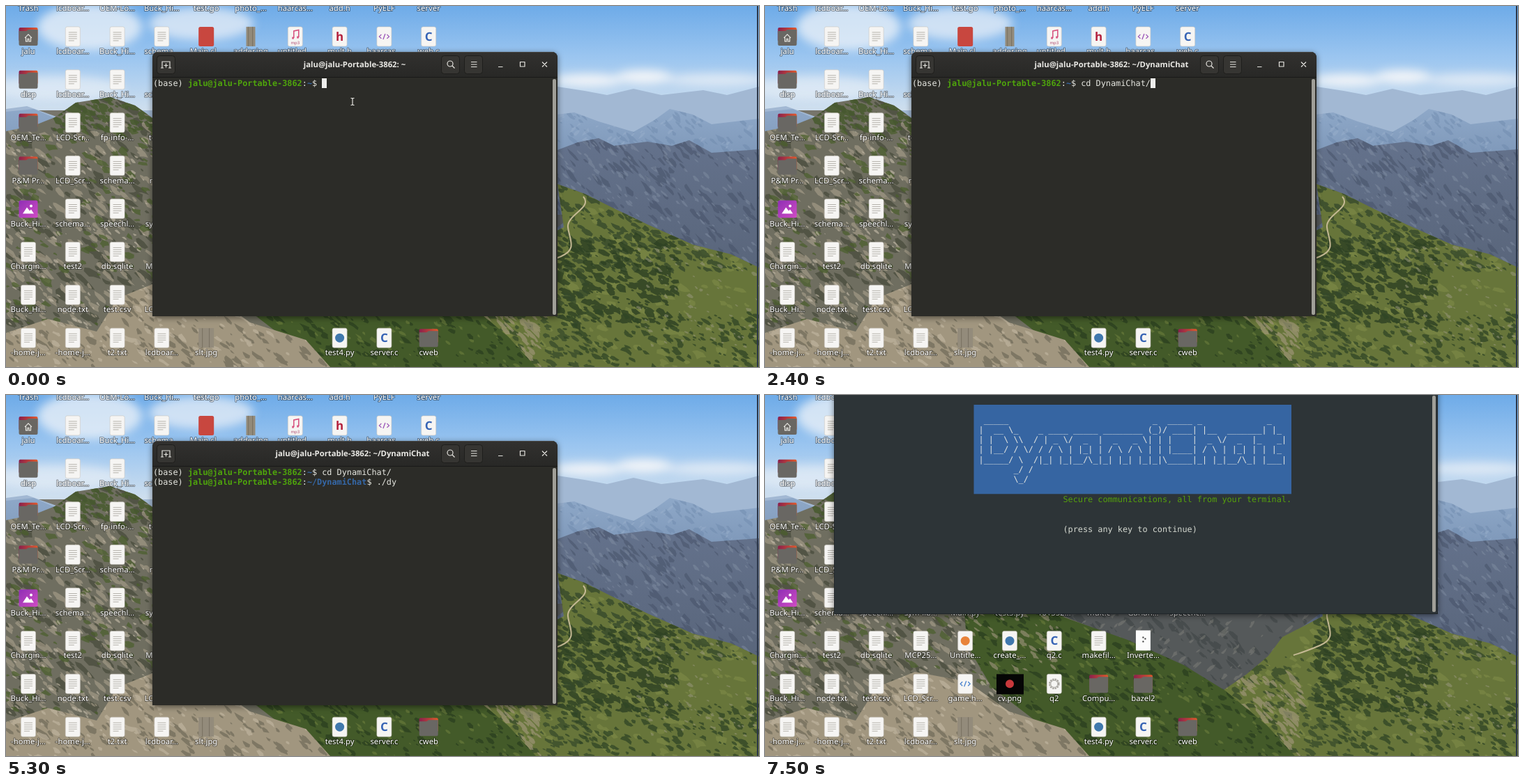
An HTML page that plays this animation: 1080 by 519 pixels, repeating every 8000 ms.

```html
<!DOCTYPE html>
<html lang="en">
<head>
<meta charset="utf-8">
<title>Terminal session</title>
<style>
  html, body { margin: 0; width: 100%; height: 100%; overflow: hidden; background: #77756b; }
  svg { display: block; width: 1080px; height: 519px; }
  text { white-space: pre; text-rendering: geometricPrecision; }
  .mono { font: 11.835px "DejaVu Sans Mono", monospace; fill: #e6e7e1; }
  .bold { font-weight: bold; }
  .label { font: 11.3px "Noto Sans", sans-serif; fill: #fff; text-anchor: middle;
           paint-order: stroke; stroke: rgba(0,0,0,.4); stroke-width: 2px; stroke-linejoin: round; }
  .title { font: bold 11.3px "Noto Sans", sans-serif; fill: #e9e8e4; text-anchor: middle; }
  .glyph { font: bold 17px "Noto Sans", sans-serif; text-anchor: middle; }
  .window { filter: drop-shadow(0 2px 4px rgba(0,0,0,.5)); }
  .line { fill: none; stroke: #e4e3de; stroke-width: 1.2; }
</style>
</head>
<body>
<svg viewBox="0 0 1080 519" xmlns="http://www.w3.org/2000/svg">
  <defs>
    <linearGradient id="sky" x2="0" y2="1">
      <stop offset="0" stop-color="#6eabe8"/><stop offset=".5" stop-color="#9cc6f0"/>
      <stop offset="1" stop-color="#cfdfee"/>
    </linearGradient>
    <linearGradient id="haze" x2="0" y2="1">
      <stop offset="0" stop-color="#8ea8c8"/><stop offset="1" stop-color="#7089ab"/>
    </linearGradient>
    <linearGradient id="range" x2="0" y2="1">
      <stop offset="0" stop-color="#64728c"/><stop offset="1" stop-color="#515c6e"/>
    </linearGradient>
    <linearGradient id="bar" x2="0" y2="1">
      <stop offset="0" stop-color="#32312f"/><stop offset="1" stop-color="#282826"/>
    </linearGradient>
    <linearGradient id="tab"><stop offset="0" stop-color="#8a1f4c"/><stop offset="1" stop-color="#e0592c"/></linearGradient>
    <linearGradient id="pic" x2="1" y2="1"><stop offset="0" stop-color="#8f2fb5"/><stop offset="1" stop-color="#d04cc4"/></linearGradient>
    <filter id="soft" x="-30%" y="-100%" width="160%" height="300%"><feGaussianBlur stdDeviation="7"/></filter>
  </defs>

  <g id="photo">
    <rect width="1080" height="150" fill="url(#sky)"/>
    <g fill="#f1f4f8" filter="url(#soft)">
      <ellipse cx="120" cy="30" rx="75" ry="34" opacity=".75"/>
      <ellipse cx="280" cy="25" rx="75" ry="24" opacity=".7"/>
      <ellipse cx="70" cy="118" rx="100" ry="18" opacity=".6"/>
      <ellipse cx="835" cy="107" rx="50" ry="9"/>
      <ellipse cx="915" cy="102" rx="40" ry="10"/>
      <ellipse cx="1020" cy="106" rx="75" ry="9" opacity=".7"/>
    </g>
  </g>
  <g id="icons"></g>
  <path d="M1078 0V519" stroke="#2b3648" stroke-width="2"/>

  <g id="shell" class="window">
    <path d="M210 446V74a8 8 0 0 1 8-8H783a8 8 0 0 1 8 8V446Z" fill="#2c2c28"/>
    <path d="M210 102V74a8 8 0 0 1 8-8H783a8 8 0 0 1 8 8V102Z" fill="url(#bar)"/>
    <path d="M210 102.5H791" stroke="#191918"/>
    <path d="M216 66.5H785" stroke="#454441"/>
    <g fill="#363532" stroke="#1e1e1c">
      <rect x="216.500" y="71.500" width="26" height="26" rx="4"/>
      <rect x="624.500" y="71.500" width="26" height="26" rx="4"/>
      <rect x="657.500" y="71.500" width="26" height="26" rx="4"/>
    </g>
    <g class="line">
      <path d="M224 89V80H235V89M222 89H226M233 89H237M229.500 82.500V88.500M226.500 85.500H232.500"/>
      <circle cx="637" cy="83" r="4"/><path d="M640 86L643.500 89.500"/>
      <path d="M667 80.500H675.500M667 84H675.500M667 87.500H675.500"/>
      <path d="M706 87.500H712.500M737.500 80.500H744V87H737.500ZM769 80.500L776 87.500M776 80.500L769 87.500"/>
    </g>
    <text id="title" class="title" x="500" y="88"></text>
    <rect x="784" y="105" width="5" height="339" rx="2" fill="#a09f98"/>
    <g id="first"></g>
    <g id="second"></g>
    <rect id="cursor" width="7" height="14" fill="#eeeeec"/>
    <path id="beam" class="line" d="M494.500 132.500H496L497 133.500L498 132.500H499.500M497 133.500V141.500M494.500 142.500H496L497 141.500L498 142.500H499.500"/>
  </g>

  <g id="splash">
    <g class="window">
      <path d="M99-20H965V315H99Z" fill="#2d3437"/>
    </g>
    <path d="M99.500 0V314.500H964.500V0" fill="none" stroke="#20262a"/>
    <rect x="957" y="1" width="5" height="311" rx="2" fill="#a09f98"/>
    <rect x="299.500" y="14" width="455.500" height="128.300" fill="#3665a2"/>
    <g id="banner"></g>
    <text class="mono" x="427.500" y="154" style="fill:#55a00c">Secure communications, all from your terminal.</text>
    <text class="mono" x="427.500" y="197" style="fill:#d3d7cf">(press any key to continue)</text>
  </g>
</svg>
<script>
const $ = id => document.getElementById(id);
const NS = 'http://www.w3.org/2000/svg';

function add(parent, tag, attrs, text) {
  const el = document.createElementNS(NS, tag);
  for (const k in attrs) el.setAttribute(k, attrs[k]);
  if (text) el.textContent = text;
  return parent.appendChild(el);
}

/* ---- wallpaper ---- */
let seed = 11;
const rand = () => (seed = seed * 16807 % 2147483647) / 2147483647;
const photo = $('photo');
let clips = 0;

function land(points, fill) {
  const id = 'clip' + clips++;
  add(photo, 'polygon', { points, fill });
  add(add(photo, 'clipPath', { id }), 'polygon', { points });
  return id;
}

// Irregular flecks inside one piece of land; slant leans them along the slope.
function flecks(clip, [x, y, w, h], count, size, fill, opacity, slant = 0) {
  let d = '';
  for (let i = 0; i < count; i++) {
    const cx = x + rand() * w, cy = y + rand() * h, r = size * (.3 + rand());
    for (let k = 0; k < 7; k++) {
      const a = k * Math.PI / 3.5, q = r * (.4 + rand() * .8);
      const px = Math.cos(a) * q, py = Math.sin(a) * q * .6;
      d += (k ? 'L' : 'M') + (cx + px).toFixed(1) + ' ' + (cy + py + px * slant).toFixed(1);
    }
    d += 'Z';
  }
  add(photo, 'path', { d, fill, opacity, 'clip-path': `url(#${clip})` });
}

land('0,148 30,144 75,160 110,150 500,150 791,116 830,122 862,128 900,119 940,128 1000,121 1034,128 1080,116 1080,300 0,300', '#a2b8d3');
const far = land('0,152 40,148 90,170 500,200 791,156 815,153 850,166 900,181 930,164 952,148 985,156 1012,170 1080,162 1080,280 0,280', 'url(#haze)');
flecks(far, [780, 150, 300, 60], 90, 7, '#6a85a9', .4, .7);
flecks(far, [780, 150, 300, 60], 60, 5, '#a2b5cd', .35, -.6);
const range = land('400,300 700,240 791,207 820,196 850,190 872,201 920,195 955,201 980,193 1012,211 1080,206 1080,420 640,519 400,420', 'url(#range)');
flecks(range, [780, 190, 300, 200], 260, 8, '#424d62', .45, .9);
flecks(range, [780, 190, 300, 200], 240, 5, '#8490a5', .45, .8);
const cliff = land('380,300 815,300 735,360 720,385 660,430 620,480 400,400', '#55595a');
flecks(cliff, [390, 300, 400, 150], 200, 8, '#3a4041', .5, .8);
flecks(cliff, [390, 300, 400, 150], 170, 5, '#83837d', .45, -.7);

const meadow = land('655,426 690,402 722,375 742,348 800,318 791,256 830,270 870,290 920,314 985,343 1040,357 1080,376 1080,519 640,519', '#67753a');
flecks(meadow, [640, 260, 440, 260], 230, 9, '#84904b', .5, .3);
flecks(meadow, [790, 250, 290, 130], 420, 7, '#33472a', .75, .4);
flecks(meadow, [790, 330, 170, 130], 260, 8, '#2c4022', .8, .3);
flecks(meadow, [640, 370, 200, 150], 210, 7, '#34482a', .7, .4);
flecks(meadow, [800, 440, 280, 80], 150, 7, '#2f4424', .75, .4);
flecks(meadow, [650, 405, 120, 115], 150, 7, '#a1977c', .65, .8);
flecks(meadow, [900, 340, 180, 150], 90, 4, '#9c9a80', .5, .4);
add(photo, 'path', { d: 'M828 274C842 290 804 300 806 318S820 350 796 360S770 370 758 374', fill: 'none', stroke: '#c5b994', 'stroke-width': 2 });

const crag = land('0,180 40,172 70,160 100,139 150,131 185,143 230,175 400,306 470,335 560,410 650,470 720,519 0,519', '#6f6e60');
flecks(crag, [0, 130, 360, 390], 420, 10, '#3b4030', .55, .6);
flecks(crag, [0, 165, 360, 355], 420, 8, '#aaa08d', .6, .7);
flecks(crag, [0, 180, 330, 280], 220, 8, '#4a5f2b', .7, .3);
flecks(crag, [0, 180, 360, 340], 280, 4, '#c9bfac', .6, .6);
flecks(crag, [70, 130, 150, 50], 170, 7, '#45592b', .8, .3);
const wood = land('285,300 400,305 430,320 520,352 600,388 660,425 720,475 760,519 440,519 390,470 325,420 290,360', '#435a29');
flecks(wood, [280, 300, 480, 219], 480, 7, '#293d1f', .7, .5);
flecks(wood, [280, 300, 480, 219], 260, 5, '#6c7d3c', .6, .5);
flecks(wood, [280, 300, 140, 100], 50, 6, '#a0967f', .6, .6);
const ledge = land('0,470 60,450 130,468 160,420 215,398 290,412 350,455 430,480 465,519 0,519', '#a1967f');
flecks(ledge, [0, 390, 465, 130], 190, 8, '#635f4f', .55, .7);
flecks(ledge, [0, 390, 465, 130], 200, 7, '#c3b8a2', .6, .5);

/* ---- desktop icons ---- */
const sheet = g => add(g, 'rect', { x: -10.5, y: -14, width: 21, height: 28, rx: 2.5, fill: '#f6f5f3', stroke: '#c9c6c0', 'stroke-width': .6 });
const letter = (s, fill) => g => { sheet(g); add(g, 'text', { class: 'glyph', y: 6, fill }, s); };
const code = stroke => g => {
  sheet(g);
  add(g, 'path', { d: 'M-4-3L-7 0L-4 3M4-3L7 0L4 3M1.500-4L-1.500 4', fill: 'none', stroke, 'stroke-width': 1.3 });
};
const mark = fill => g => { sheet(g); add(g, 'circle', { r: 6.5, fill }); };
const slab = w => g => {
  add(g, 'rect', { x: -w / 2, y: -14, width: w, height: 28, fill: '#938b7b' });
  add(g, 'path', { d: `M${-w / 4}-14V14M${w / 5}-14V14`, stroke: '#777061' });
};
const folder = g => {
  add(g, 'rect', { x: -13.5, y: -13, width: 27, height: 20, rx: 2, fill: 'url(#tab)' });
  add(g, 'path', { d: 'M-13.500-8H-3L0-10H13.500V11a2 2 0 0 1-2 2H-11.500a2 2 0 0 1-2-2Z', fill: '#696763' });
};
const kinds = {
  doc(g) {
    sheet(g);
    add(g, 'path', { d: 'M-6-6H6M-6-3H6M-6 0H6M-6 3H6M-6 6H2', stroke: '#b5b2ac' });
  },
  folder,
  home(g) {
    folder(g);
    add(g, 'path', { d: 'M-5 2L0-3L5 2M-3.500 1V7H-1V3.500H1V7H3.500V1', class: 'line' });
  },
  c: letter('C', '#3764b5'),
  h: letter('h', '#b3203d'),
  tag: code('#9a55b8'),
  web: code('#4a83cf'),
  py: mark('#4078ad'),
  nb: mark('#e8833a'),
  red: g => add(g, 'rect', { x: -11, y: -14, width: 22, height: 28, rx: 2.5, fill: '#c8473f' }),
  slab: slab(22),
  slim: slab(13),
  mp3(g) {
    sheet(g);
    add(g, 'path', { d: 'M-2 2V-8L5-9.500V1', fill: 'none', stroke: '#d64f7c', 'stroke-width': 1.5 });
    add(g, 'path', { d: 'M-4.500 2h2.500M2.500 1h2.500', stroke: '#d64f7c', 'stroke-width': 3 });
    add(g, 'text', { y: 11, fill: '#b04a70', style: 'font:6px "Noto Sans",sans-serif;text-anchor:middle' }, 'mp3');
  },
  pic(g) {
    add(g, 'rect', { x: -13.5, y: -12, width: 27, height: 25, rx: 2.5, fill: 'url(#pic)' });
    add(g, 'path', { d: 'M-8 7L-2-2L2 3L4 1L8 7Z', fill: '#fff' });
    add(g, 'circle', { cx: 4, cy: -4, r: 2, fill: '#fff' });
  },
  dark(g) {
    add(g, 'rect', { x: -19, y: -14, width: 39, height: 29, fill: '#050505' });
    add(g, 'circle', { r: 6, fill: '#c8383b' });
  },
  gear(g) {
    sheet(g);
    add(g, 'circle', { r: 6.5, fill: 'none', stroke: '#aaa7a1', 'stroke-width': 2.5, 'stroke-dasharray': '2.4 1' });
    add(g, 'circle', { r: 5, fill: 'none', stroke: '#aaa7a1' });
  },
  page(g) {
    add(g, 'rect', { x: -10.5, y: -15, width: 21, height: 29, fill: '#fcfcfc' });
    add(g, 'path', { d: 'M-1-5h2M2-3h2M-1 1h2', stroke: '#333', 'stroke-width': 2 });
  }
};

[
  'doc Trash|doc lcdboar…|doc OEM-Lo…|doc Buck_Hi…|doc test.go|doc photo_…|doc haarcas…|h add.h|folder PyELF|folder server',
  'home jalu|doc lcdboar…|doc Buck_Hi…|doc schema…|red Main.cl…|slim adder.jpg|mp3 untitled…|h mult.h|tag haarcas…|c web.c',
  'folder disp|doc lcdboar…|doc Buck_Hi…|doc schema…',
  'folder OEM_Te…|doc LCD-Scr…|doc fp-info-…|doc test.txt',
  'folder P&M Pr…|doc LCD_Scr…|doc schema…|doc main.c',
  'pic Buck_Hi…|doc schema…|doc speechl…|doc sym-lib…|py Main.py|py test3.py|doc 101352…|c mult.c|doc Garlan…|doc speechc…',
  'doc Chargin…|doc test2|doc db.sqlite|doc MCP25…|nb Untitle…|py create_…|c q2.c|doc makefil…|page Inverte…',
  'doc Buck_Hi…|doc node.txt|doc test.csv|doc LCD_Scr…|web game.h…|dark cv.png|gear q2|folder Compu…|folder bazel2',
  'doc -home-j…|doc -home-j…|doc t2.txt|doc lcdboar…|slab slt.jpg|||py test4.py|c server.c|folder cweb'
].forEach((row, r) => row.split('|').forEach((cell, c) => {
  if (!cell) return;
  const cut = cell.indexOf(' ');
  const g = add($('icons'), 'g', { transform: `translate(${32 + c * 63.8} ${-18 + r * 61.9})` });
  kinds[cell.slice(0, cut)](g);
  add(g, 'text', { class: 'label', y: 25 }, cell.slice(cut + 1));
}));

/* ---- terminal ---- */
const CELL = 7.125, LEFT = 211;
const HOST = 'jalu@jalu-Portable-3862';

// Draws the prompt and returns the line that will hold the typed text.
function prompt(g, y, path) {
  let col = 0;
  const run = (text, fill, bold) => {
    const el = add(g, 'text', { class: bold ? 'mono bold' : 'mono', x: LEFT + col * CELL, y }, text);
    if (fill) el.style.fill = fill;
    col += text.length;
    return el;
  };
  run('(base) ');
  run(HOST, '#4fa50c', true);
  run(':');
  run(path, '#3568a8', true);
  run('$ ');
  return { el: run(''), col, top: y - 11 };
}
const lines = [prompt($('first'), 115, '~'), prompt($('second'), 129, '~/DynamiChat')];

const banner = [
  '  _____                             _  _____ _             _',
  ' |  __ \\_    _ ____ _____ ________ (_)/ ____| |__  _______| |_',
  ' | |  \\ \\\\  / | _ \\/  _  |  _   _ \\| | |    |  _ \\/  _  |_   _|',
  ' | |__/ / \\/ / / \\ | |_| | / \\ / \\ | | |____| / \\ | |_| | | |_',
  ' |_____/ \\  /|_| |_|__/\\_|_| |_| |_|_|\\_____|_| |_|__/\\_| |___|',
  '        _/ /',
  '        \\_/'
];
banner.forEach((s, i) => add($('banner'), 'text', { class: 'mono', x: 299.5, y: 39.5 + i * 14.27 }, s));

// time, line, typed text, cursor lit
const steps = [
  [0, 0, '', 1], [600, 0, '', 0], [900, 0, 'cd', 1], [1100, 0, 'cd ', 1],
  [1600, 0, 'cd D', 1], [1900, 0, 'cd Dy', 1], [2100, 0, 'cd DynamiChat/', 1],
  [3000, 1, '', 1], [3500, 1, '', 0], [3900, 1, '.', 1], [4100, 1, './', 1],
  [4800, 1, './dy', 1], [5300, 1, './dy', 0], [5700, 1, './dy', 1],
  [6000, 1, './dyn', 1], [6300, 1, './dyn', 0], [6500, 1, './dynamichat ', 1],
  [7000, 1, './dynamichat ', 0], [7200, 1, './dynamichat ', 1]
];
const show = (id, on) => { $(id).style.display = on ? '' : 'none'; };

function draw() {
  const t = performance.now() % 8000;
  const [, row, typed, lit] = steps.filter(s => s[0] <= t).pop();
  const { col, top } = lines[row];
  lines[0].el.textContent = row ? 'cd DynamiChat/' : typed;
  lines[1].el.textContent = row ? typed : '';
  $('cursor').setAttribute('x', Math.round(LEFT + (col + typed.length) * CELL));
  $('cursor').setAttribute('y', top);
  $('title').textContent = HOST + (t < 2400 ? ': ~' : ': ~/DynamiChat');
  $('title').setAttribute('x', t < 2400 ? 500 : 497);
  show('cursor', lit);
  show('second', row);
  show('beam', t < 700);
  show('shell', t < 7500);
  show('splash', t >= 7500);
  requestAnimationFrame(draw);
}
draw();
</script>
</body>
</html>
```
